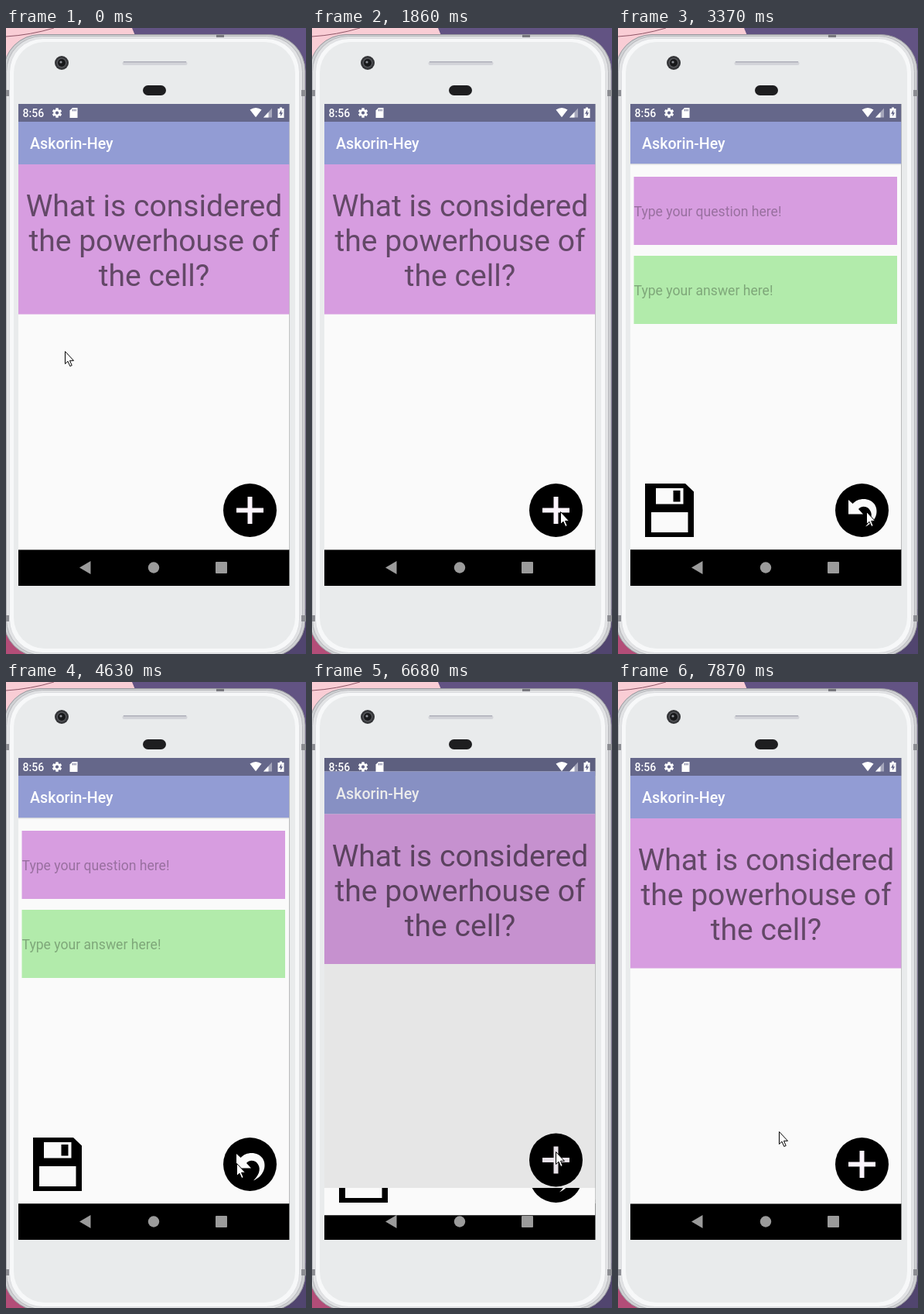
Animation of 388x808 px, one loop 8 s. Source, as an HTML page with a canvas:

```html
<!DOCTYPE html>
<html lang="en">
<head>
<meta charset="utf-8">
<title>Flashcard app</title>
<style>
  html, body { margin: 0; width: 100%; height: 100%; overflow: hidden; background: #625383; }
  canvas { display: block; width: 388px; height: 808px; }
</style>
</head>
<body>
<canvas id="stage"></canvas>
<script>
const W = 388, H = 808, LOOP = 8000;
const SCREEN = { x: 16, y: 98, w: 350.5, h: 622 };
const PAGE_H = 575.5;
const PAPER = '#fafafa';
const canvas = document.getElementById('stage');
const ctx = canvas.getContext('2d');
const dpr = window.devicePixelRatio || 1;
canvas.width = W * dpr;
canvas.height = H * dpr;

// time, pointer x, pointer y
const POINTER = [
  [0, 76, 417], [500, 128, 427], [650, 168, 445], [780, 207, 457],
  [930, 250, 484], [1050, 276, 515], [1200, 297, 545], [1320, 312, 572],
  [1440, 319, 591], [1590, 321, 609], [1710, 321, 621], [1860, 321, 624],
  [4210, 316, 629], [4370, 309, 632], [4490, 303, 632], [4630, 298, 621],
  [4780, 297, 620], [4900, 299, 620], [5020, 302, 619], [5170, 306, 617],
  [5290, 311, 613], [5410, 315, 609], [5560, 315, 607], [6680, 315, 606],
  [7480, 319, 615], [7630, 321, 633], [7750, 270, 612], [7870, 208, 580]
];

// Screen states: card page shift and dimming, editor shift and visible band
const VIEWS = [
  [0, { card: 0, dim: 0 }],
  [3100, { card: -4.5, dim: 0.09, edit: 17, from: 219 }],
  [3220, { card: -5.5, dim: 0.1, edit: 4, from: 102 }],
  [3370, { edit: 0, from: 98 }],
  [6680, { card: -5.5, dim: 0.08, edit: 15, from: 653 }],
  [6810, { card: -1.5, dim: 0.02 }],
  [6930, { card: 0, dim: 0 }]
];

const at = (keys, t) => keys.filter(k => k[0] <= t).pop();

function rect(x, y, w, h, color) {
  ctx.fillStyle = color;
  ctx.fillRect(x, y, w, h);
}

// Full-width band of the app screen
const band = (y, h, color) => rect(SCREEN.x, y, SCREEN.w, h, color);

function disc(x, y, r, color) {
  ctx.fillStyle = color;
  ctx.beginPath();
  ctx.arc(x, y, r, 0, Math.PI * 2);
  ctx.fill();
}

function pill(x, y, w, h, r, color, line) {
  ctx.beginPath();
  ctx.roundRect(x, y, w, h, r);
  ctx.fillStyle = color;
  ctx.fill();
  if (line) {
    ctx.strokeStyle = line;
    ctx.lineWidth = 1;
    ctx.stroke();
  }
}

function shape(d, color) {
  ctx.fillStyle = color;
  ctx.fill(new Path2D(d));
}

function text(str, x, y, size, color, weight = 400, align = 'left') {
  ctx.font = `${weight} ${size}px Roboto, sans-serif`;
  ctx.textAlign = align;
  ctx.fillStyle = color;
  ctx.fillText(str, x, y);
}

function shifted(dx, dy, draw) {
  ctx.save();
  ctx.translate(dx, dy);
  draw();
  ctx.restore();
}

function clipped(x, y, w, h, draw) {
  ctx.save();
  ctx.beginPath();
  ctx.rect(x, y, w, h);
  ctx.clip();
  draw();
  ctx.restore();
}

function wallpaper() {
  rect(0, 0, W, H, '#625383');
  shape('M0 0H163L168 12L0 60Z', '#f9cdd5');
  ctx.strokeStyle = '#8d5465';
  ctx.lineWidth = 1;
  ctx.stroke(new Path2D('M0 11Q32 9 62 0'));
  shape('M0 750H60V808H0Z', '#b34d78');
  shape('M330 750H388V808H330Z', '#51456f');
}

function phone() {
  pill(-3, 8.5, 390, 803, 47, '#cfd0d3', '#96969c');
  pill(0.5, 10.5, 383, 799, 46, '#e2e3e5', '#b7b8bc');
  for (const y of [80, 758]) {
    rect(-2, y, 6, 8, '#8c8d92');
    rect(382, y, 6, 8, '#8c8d92');
  }
  rect(272, 9, 10, 3, '#77777d');
  pill(4.5, 13.5, 375, 793, 43, '#f7f8f9', '#dcdde0');
  pill(10, 18, 364, 783, 40, '#e9ebec');

  disc(72, 45, 9, '#343538');
  disc(72, 45, 6.5, '#56575b');
  disc(72, 45, 5, '#17181a');
  disc(71, 44, 1.6, '#8d8f96');
  pill(150.5, 43, 84, 5, 2.5, '#d3d4d9');
  rect(152, 43, 81, 1.5, '#aeafba');
  pill(177, 74, 30, 13, 6.5, '#1e1e20');
}

function navBar() {
  band(673, 47, '#000');
  shape('M95 696.5L109.5 688V705Z', '#9b9b9b');
  disc(191, 696.5, 7.2, '#9b9b9b');
  pill(271, 689, 15, 15, 1, '#9b9b9b');
}

function statusIcons() {
  text('8:56', 21.5, 115, 14, '#fff', 500);

  shifted(66, 109.5, () => {
    ctx.fillStyle = '#fff';
    for (let i = 0; i < 6; i++) {
      ctx.rotate(Math.PI / 3);
      ctx.fillRect(-1.7, -6.2, 3.4, 4);
    }
    ctx.strokeStyle = '#fff';
    ctx.lineWidth = 2.6;
    ctx.beginPath();
    ctx.arc(0, 0, 3.4, 0, Math.PI * 2);
    ctx.stroke();
    disc(0, 0, 2.1, '#65678a');
  });

  shape('M86 103H92.5V116H82.5V106.5Z', '#fff');
  for (let i = 0; i < 3; i++) rect(85.7 + i * 2, 104.8, 1, 2.6, '#65678a');

  shape('M315.5 105.6Q323 100.6 330.5 105.6L323 115.2Z', '#fff');
  shape('M344 103.5V115.5H333Z', '#a5a6bb');
  shape('M339.5 108.5V115.5H333Z', '#fff');
  shape('M354 102.5H357V104H359.5V116H351.5V104H354Z', '#fff');
  shape('M356.2 105.5L353 110.8H355.1V114.3L358.1 109.2H356.2Z', '#65678a');
}

function header() {
  band(98, PAGE_H, PAPER);
  band(98, 23, '#65678a');
  band(121, 55, '#929cd4');
  text('Askorin-Hey', 31, 156, 19.6, '#fff', 500);
}

function fab() {
  disc(315.5, 622.5, 34.5, '#000');
}

function cardPage() {
  header();
  band(176, 193.5, '#d79de0');
  ['What is considered', 'the powerhouse of', 'the cell?'].forEach((line, i) =>
    text(line, 191.5, 243 + i * 45, 39.1, 'rgba(0,0,0,.54)', 400, 'center'));
  fab();
  rect(298, 619.5, 35, 6, '#fbf4fc');
  rect(312.5, 605, 6, 35, '#fbf4fc');
}

function editPage() {
  header();
  band(175, 1, '#d5d6dc');
  band(176, 1, '#ececee');
  const field = (y, color, hint) => {
    rect(20.5, y, 340.5, 88, color);
    text(hint, 20.5, y + 50.5, 17.6, 'rgba(0,0,0,.29)');
  };
  field(192, '#d79de0', 'Type your question here!');
  field(294, '#b2ebab', 'Type your answer here!');

  shape('M35 588H87L98 598.5V657H35Z', '#000');
  rect(49, 594, 35.5, 20.5, PAPER);
  rect(71.5, 597, 9, 14.5, '#000');
  rect(43, 625, 47.5, 26, PAPER);

  fab();
  shape('M298 609L303.5 614C311 605.5 326 606 332 615C338 625 333 638 320 643.5' +
    'C329 635 330 626 324 620C319 616 313 618 311 621L317 627.5H298Z', PAPER);
}

function pointer(x, y) {
  shifted(x, y, () => {
    const arrow = new Path2D('M.5 .5V16.5L4 13.2L6.8 19.5L9.2 18.5L6.5 12.3H11.5Z');
    ctx.fillStyle = '#fff';
    ctx.fill(arrow);
    ctx.strokeStyle = '#000';
    ctx.lineWidth = 1;
    ctx.stroke(arrow);
  });
}

function screen(view) {
  rect(SCREEN.x, SCREEN.y, SCREEN.w, SCREEN.h, '#000');
  navBar();
  if ('card' in view) {
    band(98, 23, '#65678a');
    shifted(0, view.card, cardPage);
    if (view.dim) band(98, PAGE_H + view.card, `rgba(0,0,0,${view.dim})`);
  }
  if ('edit' in view) {
    clipped(SCREEN.x, view.from, SCREEN.w, 98 + PAGE_H + view.edit - view.from, () =>
      shifted(0, view.edit, editPage));
  }
  statusIcons();
}

function frame(now) {
  const t = now % LOOP;
  ctx.setTransform(dpr, 0, 0, dpr, 0, 0);
  wallpaper();
  phone();
  clipped(SCREEN.x, SCREEN.y, SCREEN.w, SCREEN.h, () => screen(at(VIEWS, t)[1]));
  const [, x, y] = at(POINTER, t);
  pointer(x, y);
}

const start = performance.now();
function loop() {
  frame(performance.now() - start);
  requestAnimationFrame(loop);
}
loop();
</script>
</body>
</html>
```
